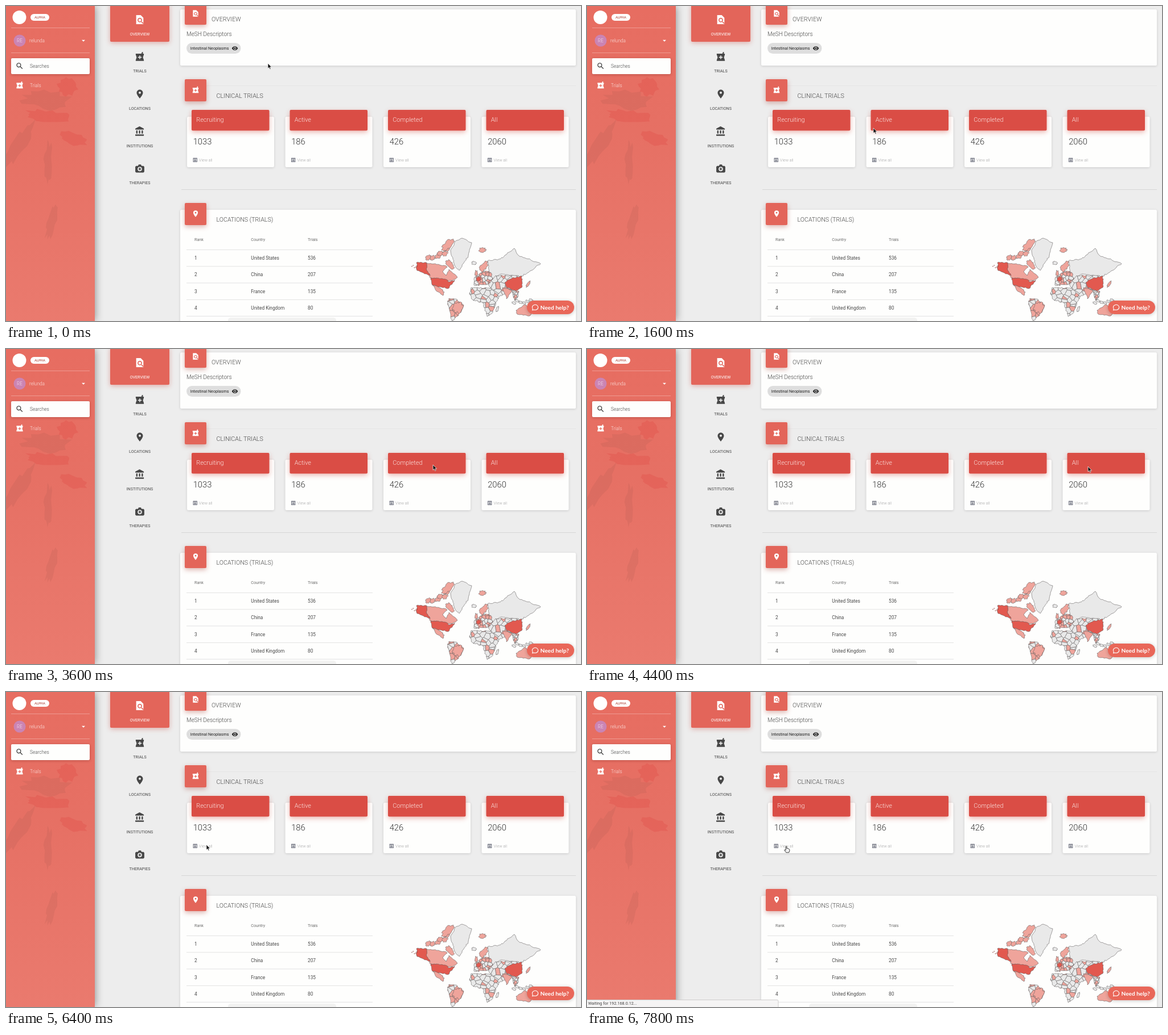
These frames come from a looping animation (1010 px wide and 555 px high, 8 s). An HTML page with a canvas:

```html
<!DOCTYPE html>
<html lang="en">
<head>
<meta charset="utf-8">
<title>Trials overview</title>
<style>
html, body { margin: 0; width: 100%; height: 100%; overflow: hidden; background: #ededed; }
canvas, svg { position: absolute; left: 0; top: 0; width: 1010px; height: 555px; }
text { font-family: Roboto, sans-serif; white-space: pre; }
</style>
</head>
<body>
<canvas id="page"></canvas>
<svg id="ink" viewBox="0 0 1010 555">
  <g id="labels"></g>
  <g id="status">
    <path d="M-1 542.5H334q2 0 2 2V556H-1z" fill="#f5f4f4" stroke="#cfcdcd"/>
    <text x="2" y="551.3" font-size="7.3" fill="#444">Waiting for 192.168.0.12...</text>
  </g>
  <path id="arrow" d="M0 0V9.3L2.1 7.3L3.6 10.6L5.1 9.9L3.7 6.8H6.5Z" fill="#111" stroke="#fff" stroke-width=".7"/>
  <path id="hand" d="M-2 1V-4.6Q-1.2 -6.2 -.3 -4.6V-1.4Q2.6 -2 4.7 .7V2.6L3.6 5.9H-1.4L-4.5 1.7Q-4 .1 -2 1.9Z" fill="#f4f4f4" stroke="#222" stroke-width=".9"/>
</svg>
<script>
const W = 1010, H = 555, LOOP = 8000, STEP = 200;
const $ = id => document.getElementById(id);
const page = $('page'), ctx = page.getContext('2d');
const ratio = window.devicePixelRatio || 1;
page.width = W * ratio;
page.height = H * ratio;
ctx.scale(ratio, ratio);

const RED = '#e3655a', PAPER = '#fefefd', DARK = '#474747';

// Ring around a centre, for use inside an even-odd icon path
const ring = (x, y, ...radii) =>
  radii.map(r => `M${x} ${y - r}a${r} ${r} 0 1 0 .01 0z`).join('');

const ICONS = {
  find: 'M4 2h10l6 6v14H4z' + ring(12, 13, 5, 3) + 'M15 17.4l1.4-1.4 4 4-1.4 1.4z',
  trials: 'M21 5h-2.6l1.1-3.1L17 1l-1.4 4H3v2l2 6-2 6v2h18v-2l-2-6 2-6zM16 14h-3v3h-2v-3H8v-2h3V9h2v3h3z',
  pin: 'M12 22C9 18 5 13 5 9a7 7 0 0 1 14 0c0 4-4 9-7 13z' + ring(12, 9, 2.5),
  bank: 'M4 10v7h3v-7zM10 10v7h3v-7zM16 10v7h3v-7zM2 22h19v-3H2zM11.5 1L2 6v2h19V6z',
  kit: 'M20 6h-4l-1.5-3h-5L8 6H4L2 8v11l2 2h16l2-2V8z' + ring(12, 13, 5) + 'M11 10h2v2h2v2h-2v2h-2v-2H9v-2h2z',
  eye: 'M1 12q4-7.5 11-7.5t11 7.5q-4 7.5-11 7.5t-11-7.5z' + ring(12, 12, 5, 3),
  search: ring(9.5, 9.5, 6.5, 4.5) + 'M13.4 14.9l1.5-1.5 5.6 5.6-1.5 1.5z',
  list: 'M3 3h18v18H3zM5 5v14h14V5zM7 7h10v2H7zM7 11h10v2H7zM7 15h10v2H7z'
};

function icon(name, cx, cy, size, color) {
  ctx.save();
  ctx.translate(cx - size / 2, cy - size / 2);
  ctx.scale(size / 24, size / 24);
  ctx.fillStyle = color;
  ctx.fill(new Path2D(ICONS[name]), 'evenodd');
  ctx.restore();
}

function box(x, y, w, h, fill, r = 2, shadow, blur = 6, dy = 2) {
  ctx.save();
  if (shadow) {
    ctx.shadowColor = shadow;
    ctx.shadowBlur = blur * ratio;
    ctx.shadowOffsetY = dy * ratio;
  }
  ctx.fillStyle = fill;
  ctx.beginPath();
  ctx.roundRect(x, y, w, h, r);
  ctx.fill();
  ctx.restore();
}

function disc(x, y, r, fill) {
  ctx.fillStyle = fill;
  ctx.beginPath();
  ctx.arc(x, y, r, 0, 7);
  ctx.fill();
}

const rule = (x1, x2, y, color) => box(x1, y - .5, x2 - x1, 1, color, 0);

function label(str, x, y, size, fill, weight = 400, anchor = 'start', family) {
  const el = document.createElementNS('http://www.w3.org/2000/svg', 'text');
  const attrs = { x, y, fill, 'font-size': size, 'font-weight': weight, 'text-anchor': anchor };
  for (const k in attrs) el.setAttribute(k, attrs[k]);
  if (family) el.style.fontFamily = family;
  el.textContent = str;
  $('labels').append(el);
}

// Seeded values between -.5 and .5
function seeded(s) {
  return () => (s = (s * 16807) % 2147483647) / 2147483647 - .5;
}

function trace(points) {
  const path = new Path2D();
  points.forEach(p => path.lineTo(...p));
  path.closePath();
  return path;
}

// Uneven round outline
function blob(x, y, rx, ry, tilt, rough, rnd) {
  const points = [], n = 22;
  for (let i = 0; i < n; i++) {
    const a = i / n * 2 * Math.PI, k = 1 + rnd() * rough;
    const u = Math.cos(a) * rx * k, v = Math.sin(a) * ry * k;
    points.push([x + u * Math.cos(tilt) - v * Math.sin(tilt), y + u * Math.sin(tilt) + v * Math.cos(tilt)]);
  }
  return trace(points);
}

function drawSidebar() {
  box(0, 0, 156, H, RED, 0, 'rgba(0,0,0,.45)', 14, 0);
  const g = ctx.createLinearGradient(0, 0, 0, H);
  g.addColorStop(0, '#e76d61');
  g.addColorStop(.4, '#e67064');
  g.addColorStop(1, '#ea7a6e');
  box(0, 0, 156, H, g, 0);

  const rnd = seeded(31), gray = 'rgba(175,90,80,.2)', red = 'rgba(218,50,52,.2)';
  const stain = (fill, ...shape) => {
    ctx.fillStyle = fill;
    ctx.fill(blob(...shape, .5, rnd));
  };
  ctx.save();
  ctx.beginPath();
  ctx.rect(0, 0, 156, H);
  ctx.clip();
  stain(gray, 72, 166, 42, 16, .1);
  stain(red, 108, 142, 17, 15, 0);
  stain(red, 74, 194, 42, 10, .1);
  stain(red, 118, 234, 24, 10, .3);
  stain(gray, 22, 246, 44, 11, -1);
  stain(gray, 74, 276, 36, 7, 1.6);
  stain(gray, 80, 380, 30, 8, 1.8);
  ctx.restore();

  disc(23.5, 20, 12, '#fff');
  box(43, 14, 33, 12, '#fff', 6);
  label('ALPHA', 59.5, 22, 5.9, '#b8584f', 500, 'middle');
  for (const y of [38.5, 82.5]) rule(9, 147, y, 'rgba(255,255,255,.3)');
  disc(24, 61, 10.5, '#cb84b3');
  label('RE', 24, 64, 8.3, '#f6dfee', 300, 'middle');
  label('relunda', 41, 64.2, 8.3, '#fbe3df', 300);
  ctx.fillStyle = '#fff';
  ctx.fill(new Path2D('M133 59.7h6l-3 3z'));
  box(9, 92, 138, 28, PAPER, 2, 'rgba(90,20,15,.3)', 5, 1);
  icon('search', 24, 105.7, 15, '#444');
  label('Searches', 42, 108.9, 8.3, '#444', 300);
  icon('trials', 24, 139.7, 15, '#fff');
  label('Trials', 42, 142.8, 8.3, '#fbe3df', 300);
}

function drawNav() {
  box(183, -4, 104, 67, RED, 2, 'rgba(200,70,60,.4)', 8, 2);
  const items = [['find', 'OVERVIEW'], ['trials', 'TRIALS'], ['pin', 'LOCATIONS'],
    ['bank', 'INSTITUTIONS'], ['kit', 'THERAPIES']];
  items.forEach(([name, str], i) => {
    const color = i ? DARK : '#fff';
    icon(name, 235, 24 + 65.6 * i, 19, color);
    label(str, 235, 51.7 + 65.6 * i, 7.15, color, 400, 'middle');
  });
}

const card = (x, y, w, h) => box(x, y, w, h, PAPER, 2.5, 'rgba(0,0,0,.15)', 4, 1);

function tile(y, name) {
  box(314, y, 38, 39, RED, 2, 'rgba(170,70,60,.4)', 9, 3);
  icon(name, 333, y + 19, 14, '#fff');
}

function drawOverview() {
  card(306, 6, 695, 99);
  tile(-6, 'find');
  label('OVERVIEW', 361, 26.6, 10.7, '#484848', 300);
  label('MeSH Descriptors', 317, 52.5, 10, '#444', 300);
  box(317, 65, 95.5, 19, '#dedede', 9.5);
  label('Intestinal Neoplasms', 323.7, 77.2, 7.2, '#222');
  icon('eye', 402, 74.5, 11.5, '#222');
}

function drawTrials() {
  rule(352, 1001, 140.5, '#e5e5e5');
  tile(129, 'trials');
  label('CLINICAL TRIALS', 369.5, 161.8, 10.7, '#444', 300);
  const sums = [['Recruiting', 1033], ['Active', 186], ['Completed', 426], ['All', 2060]];
  sums.forEach(([name, count], i) => {
    const x = 318 + 172.5 * i;
    card(x, 195, 153, 89);
    box(x + 8, 183, 136.5, 36.5, '#da4d45', 2, 'rgba(205,75,65,.4)', 9, 3);
    label(name, x + 16.3, 204, 10.9, '#fbe6e3', 300);
    label(count, x + 10.7, 244.3, 14.75, '#333', 300);
    icon('list', x + 14.2, 271.4, 9.5, '#4b4f60');
    label('View all', x + 21, 273.9, 7.1, '#a3a3a3', 300);
  });
  rule(308, 1001, 323.5, '#d6d6d6');
}

function drawLocations() {
  card(306, 359, 695, 210);
  tile(347, 'pin');
  label('LOCATIONS (TRIALS)', 369.5, 379.6, 10.65, '#444', 300);
  const cols = [331, 430.3, 530];
  const row = (cells, y, size, color) =>
    cells.forEach((c, i) => label(c, cols[i], y, size, color));
  row(['Rank', 'Country', 'Trials'], 414.4, 7.2, '#6c6c6c');
  const rows = [['United States', 536], ['China', 207], ['France', 135], ['United Kingdom', 80]];
  rows.forEach((cells, i) => {
    rule(317, 644, 429.5 + 29.3 * i, '#e3e3e3');
    row([i + 1, ...cells], 446.8 + 29.5 * i, 8.3, '#484848');
  });
  rule(317, 644, 546.5, '#e3e3e3');
  box(390, 549, 190, 10, '#f2f2f1', 5);
}

// Corner points joined by roughened lines
function coast(str, rnd) {
  const corners = str.split(' ').map(p => p.split(',').map(Number)), points = [];
  corners.forEach(([x, y], i) => {
    const [nx, ny] = corners[(i + 1) % corners.length];
    const parts = Math.ceil(Math.hypot(nx - x, ny - y) / 3);
    for (let k = 0; k < parts; k++) {
      const f = k / parts, rough = k ? 2.2 : 0;
      points.push([x + (nx - x) * f + rnd() * rough, y + (ny - y) * f + rnd() * rough]);
    }
  });
  return points;
}

// The part of the plane nearer to one site than to any other
function cell([sx, sy], sites) {
  const r = 30;
  let poly = [[sx - r, sy - r], [sx + r, sy - r], [sx + r, sy + r], [sx - r, sy + r]];
  for (const [ox, oy] of sites) {
    const dx = ox - sx, dy = oy - sy;
    if (!dx && !dy) continue;
    const side = ([x, y]) => (x - (sx + ox) / 2) * dx + (y - (sy + oy) / 2) * dy;
    poly = poly.flatMap((p, i) => {
      const q = poly[(i + 1) % poly.length], a = side(p), b = side(q), f = a / (a - b);
      const cut = [p[0] + (q[0] - p[0]) * f, p[1] + (q[1] - p[1]) * f];
      return [...(a <= 0 ? [p] : []), ...(a * b < 0 ? [cut] : [])];
    });
  }
  return trace(poly);
}

function drawMap() {
  const rnd = seeded(77), GRAY = '#e9e9e9', PINK = '#efa49b', HOT = '#e2594f';
  ctx.lineWidth = .55;
  ctx.strokeStyle = '#5a5656';

  const paint = (path, fill) => {
    ctx.fillStyle = fill;
    ctx.fill(path);
    ctx.stroke(path);
  };
  const land = (fill, str) => paint(trace(coast(str, rnd)), fill);
  const isle = (fill, x, y, rx, ry, tilt = 0) => paint(blob(x, y, rx, ry, tilt, .5, rnd), fill);

  // A region split into small countries, a share of them pink
  function mosaic(str, size, share) {
    const points = coast(str, rnd), path = trace(points), sites = [];
    const xs = points.map(p => p[0]), ys = points.map(p => p[1]);
    for (let y = Math.min(...ys); y < Math.max(...ys) + size; y += size)
      for (let x = Math.min(...xs); x < Math.max(...xs) + size; x += size)
        sites.push([x + rnd() * size, y + rnd() * size]);
    ctx.save();
    ctx.clip(path);
    for (const s of sites) paint(cell(s, sites), rnd() + .5 < share ? PINK : GRAY);
    ctx.restore();
    ctx.stroke(path);
  }

  // Americas
  for (let i = 0; i < 6; i++) isle(PINK, 744 + i * 6.5 + rnd() * 4, 446 - i * 3 + rnd() * 8, 5, 4, -.5);
  isle(PINK, 776, 421, 13, 6, -.8);
  isle(PINK, 779, 455, 9, 5, .8);
  land(PINK, '738,452 768,457 775,460 767,468 773,475 778,464 793,478 784,484 746,479 738,466');
  land(HOT, '721,452 738,452 739,466 745,475 722,466');
  for (let i = 0; i < 5; i++) disc(713 + i * 2.2, 459 + rnd() * 5, .8, '#8a4742');
  land(HOT, '746,479 771,481 777,486 788,483 776,498 749,492');
  land(PINK, '750,492 763,497 770,504 768,510 757,503');
  land(GRAY, '781,432 789,415 801,409 818,417 812,440 796,466 788,457');
  mosaic('778,515 790,516 804,527 799,540 790,548 783,557 776,523', 9, .5);
  isle(PINK, 794, 531, 9, 10);

  // Eurasia
  isle(GRAY, 822, 453, 4, 3);
  isle(PINK, 837, 430, 6, 4);
  isle(PINK, 839, 459, 11, 5, -1);
  isle(PINK, 826, 471, 2.5, 5);
  land(GRAY, '846,449 868,446 893,427 900,439 939,454 917,470 903,477 870,472 850,484');
  mosaic('823,478 840,466 852,470 856,488 842,491 822,492', 6, .55);
  mosaic('848,489 860,475 900,475 888,502 866,512 852,500', 9, .15);
  isle(HOT, 830, 481, 4, 4);
  land(PINK, '872,496 889,501 879,516');
  land(HOT, '876,487 886,481 906,476 906,496 896,502 879,495');
  mosaic('889,501 901,503 899,513 893,519', 5, .2);
  for (let i = 0; i < 6; i++) isle(GRAY, 892 + i * 6, 521 + rnd() * 6, 3.5, 2, .4);
  isle(PINK, 917, 490, 6, 2, -1);

  // Africa and Oceania
  mosaic('817,496 853,497 866,512 853,542 845,547 838,523 819,517 814,508', 8, .14);
  isle(GRAY, 863, 534, 2, 5, .3);
  land(PINK, '896,536 912,526 925,536 920,546 898,543');
}

function drawHelp() {
  box(915, 519, 83, 24, '#e96759', 12, 'rgba(0,0,0,.22)', 6, 1);
  ctx.strokeStyle = '#fff';
  ctx.lineWidth = 1.1;
  ctx.stroke(new Path2D('M924.6 535.8l.6-2.3a5.2 4.6 0 1 1 2.4 1.7z'));
  label('Need help?', 938.6, 534.7, 10.1, '#fff', 700, 'start', 'Lato, sans-serif');
}

function drawPage() {
  box(0, 0, W, H, '#ededed', 0);
  drawSidebar();
  drawNav();
  drawOverview();
  drawTrials();
  drawLocations();
  drawMap();
  drawHelp();
}

// Pointer stops: time, x, y
const stops = [
  [0, 460, 101], [1600, 503, 215], [2600, 651, 206], [3600, 750, 204],
  [4400, 880, 207], [4800, 880, 207], [5400, 466, 244], [6400, 352, 269], [LOOP, 349, 271]
];

function pointer(t) {
  const i = stops.findIndex(s => s[0] > t);
  const [t0, x0, y0] = stops[i - 1], [t1, x1, y1] = stops[i];
  const f = (t - t0) / (t1 - t0), e = f * f * (3 - 2 * f);
  return [x0 + (x1 - x0) * e, y0 + (y1 - y0) * e];
}

const show = (el, on) => el.setAttribute('visibility', on ? 'visible' : 'hidden');

function frame(now) {
  const t = Math.floor((now % LOOP) / STEP) * STEP;
  const [x, y] = pointer(t), link = t >= 6600;
  $('arrow').setAttribute('transform', `translate(${x} ${y})`);
  $('hand').setAttribute('transform', `translate(${x + 2} ${y + 6})`);
  show($('arrow'), !link);
  show($('hand'), link);
  show($('status'), t >= 7600);
  requestAnimationFrame(frame);
}

drawPage();
requestAnimationFrame(frame);
</script>
</body>
</html>
```
